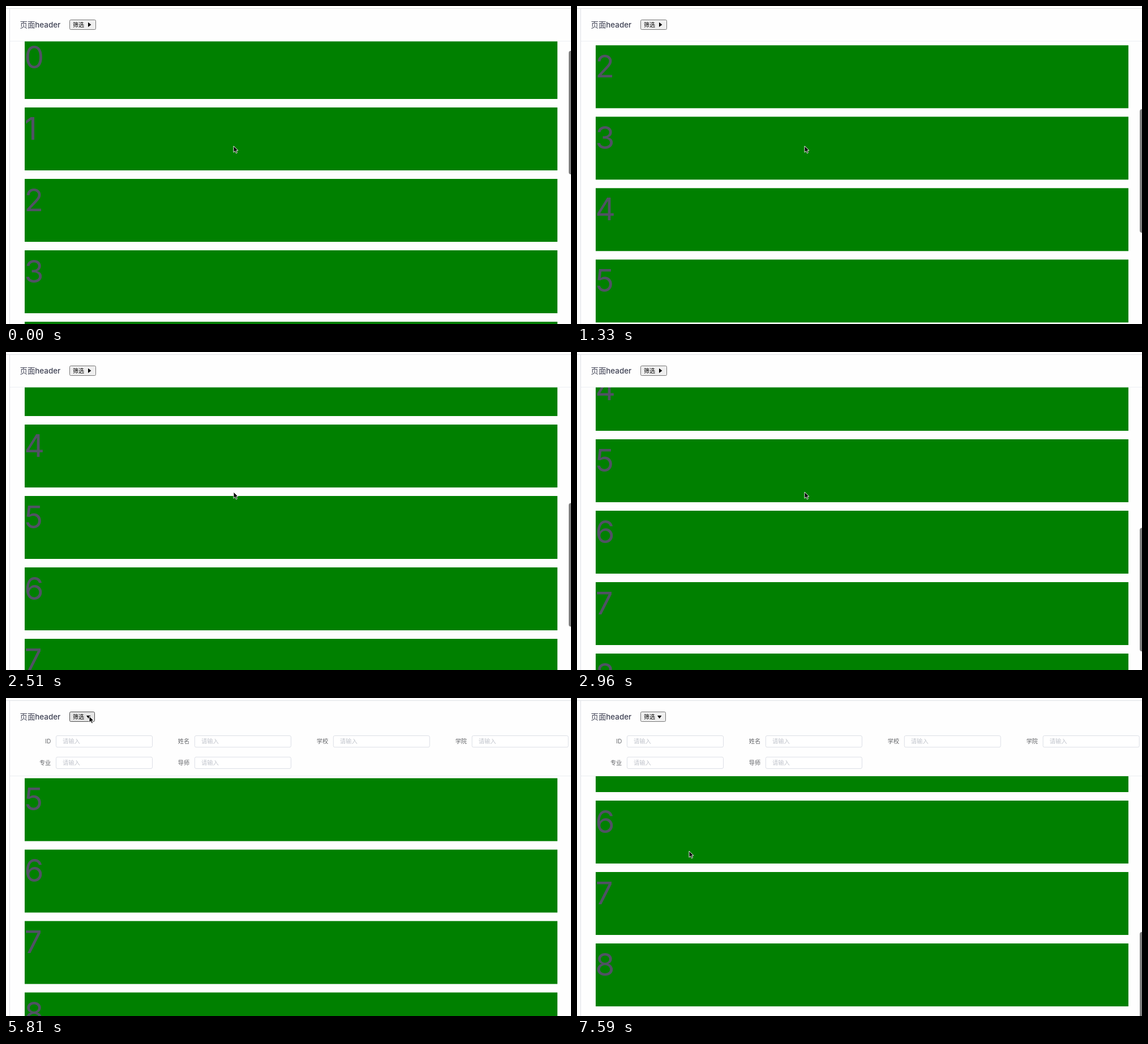
Write an HTML page that moves like this. It is 998 by 561 pixels and loops after 8000 ms.

```html
<!DOCTYPE html>
<html lang="zh">
<head>
<meta charset="utf-8">
<style>
html, body { margin: 0; width: 100%; height: 100%; overflow: hidden; background: #fefefe; }
svg { display: block; font-family: Inter, "Noto Sans CJK SC", "Noto Sans CJK", sans-serif; }
.digit { font-size: 55px; fill: #505264; }
.title { font-size: 13.4px; font-weight: 500; fill: #3f4254; }
.small { font-size: 10.2px; fill: #606266; }
.hint { font-size: 10.3px; fill: #c0c4cc; }
.button text { font-size: 10px; }
.input { fill: #fff; stroke: #dcdfe6; }
</style>
</head>
<body>
<svg id="stage" width="998" height="561" viewBox="0 0 998 561">
  <g id="list"></g>
  <rect id="thumb" x="994" width="8" rx="4" fill="#7f7f7f"/>
  <rect id="header" width="998" fill="#fefefe"/>
  <path id="rule" d="M7 0H998" stroke="#ebeef2"/>
  <path d="M0 4.5H998M6.5 4.5V561" stroke="#dfe1e6" fill="none"/>
  <text class="title" x="24.5" y="38">页面header</text>
  <g class="button">
    <rect id="box" x="112.5" y="24.5" height="17" rx="2"/>
    <text x="118" y="37">筛选</text>
    <path id="arrow"/>
  </g>
  <g id="form"></g>
  <path id="cursor" d="M0 0V11.2L2.6 8.8L4.4 12.8L6.4 11.9L4.6 8H8Z" stroke="#fff" stroke-width=".9"/>
</svg>
<script>
const $ = id => document.getElementById(id);
const LOOP = 8000, STEP = 148.6, CLOSED = 62, OPEN = 137.5, CONTENT = 1142;

// Keys: [step, value, ...]
const scrollKeys = [[0, 39], [1, 55], [5, 192], [8, 262], [11, 300], [14, 358], [17, 468],
  [20, 568], [23, 648], [25, 656], [45, 656], [47, 708], [48, 708], [51, 742.5]];
const cursorKeys = [[0, 402, 247], [24, 402, 247], [28, 151, 19], [29, 149, 26],
  [35, 149, 26], [37, 147, 32], [40, 147, 32], [43, 198, 270]];

function sample(keys, k) {
  const i = keys.findIndex(key => key[0] > k);
  if (i < 0) return keys.at(-1).slice(1);
  const a = keys[i - 1], b = keys[i], u = (k - a[0]) / (b[0] - a[0]);
  return a.slice(1).map((v, j) => v + (b[j + 1] - v) * u);
}

function set(id, attrs) {
  for (const name in attrs) $(id).setAttribute(name, attrs[name]);
}

$('list').innerHTML = [...Array(9).keys()].map(n =>
  `<rect x="33" y="${n * 126}" width="941" height="111" fill="#008000"/>
   <text class="digit" x="32.5" y="${n * 126 + 56.5}">${n}</text>`).join('');

$('form').innerHTML = ['ID', '姓名', '学校', '学院', '专业', '导师'].map((label, i) => {
  const x = i % 4 * 244.9, y = i < 4 ? 66.5 : 104.2;
  return `<text class="small" x="${x + 79.3}" y="${y + 13.8}" text-anchor="end">${label}</text>
    <rect class="input" x="${x + 88.5}" y="${y}" width="170" height="20.3" rx="2.5"/>
    <text class="hint" x="${x + 100}" y="${y + 13.8}">请输入</text>`;
}).join('');

function draw(now) {
  const k = Math.floor((now % LOOP + 20) / STEP);
  const open = k >= 38, hover = k >= 36 && k < 42;
  const bottom = open ? OPEN : CLOSED, view = 561 - bottom;
  const [scroll] = sample(scrollKeys, k);
  const [x, y] = sample(cursorKeys, k);

  set('list', { transform: `translate(0 ${bottom + 30 - scroll})` });
  set('thumb', {
    y: bottom + scroll * view / CONTENT,
    height: view * view / CONTENT,
    opacity: k < 27 || k >= 46 ? 1 : k < 28 ? .5 : 0
  });
  set('header', { height: bottom });
  set('rule', { transform: `translate(0 ${bottom})` });
  set('box', {
    width: open ? 44 : 46,
    fill: hover ? '#e5e5e5' : '#efefef',
    stroke: hover ? '#4f4f4f' : '#767676'
  });
  set('arrow', { d: open ? 'M142 31H149.4L145.7 36.2Z' : 'M145 28.8V37L150.4 32.9Z' });
  set('form', { visibility: open ? 'visible' : 'hidden' });
  set('cursor', { transform: `translate(${x} ${y})` });
}

const start = performance.now();
function tick() {
  draw(performance.now() - start);
  requestAnimationFrame(tick);
}
tick();
</script>
</body>
</html>
```
